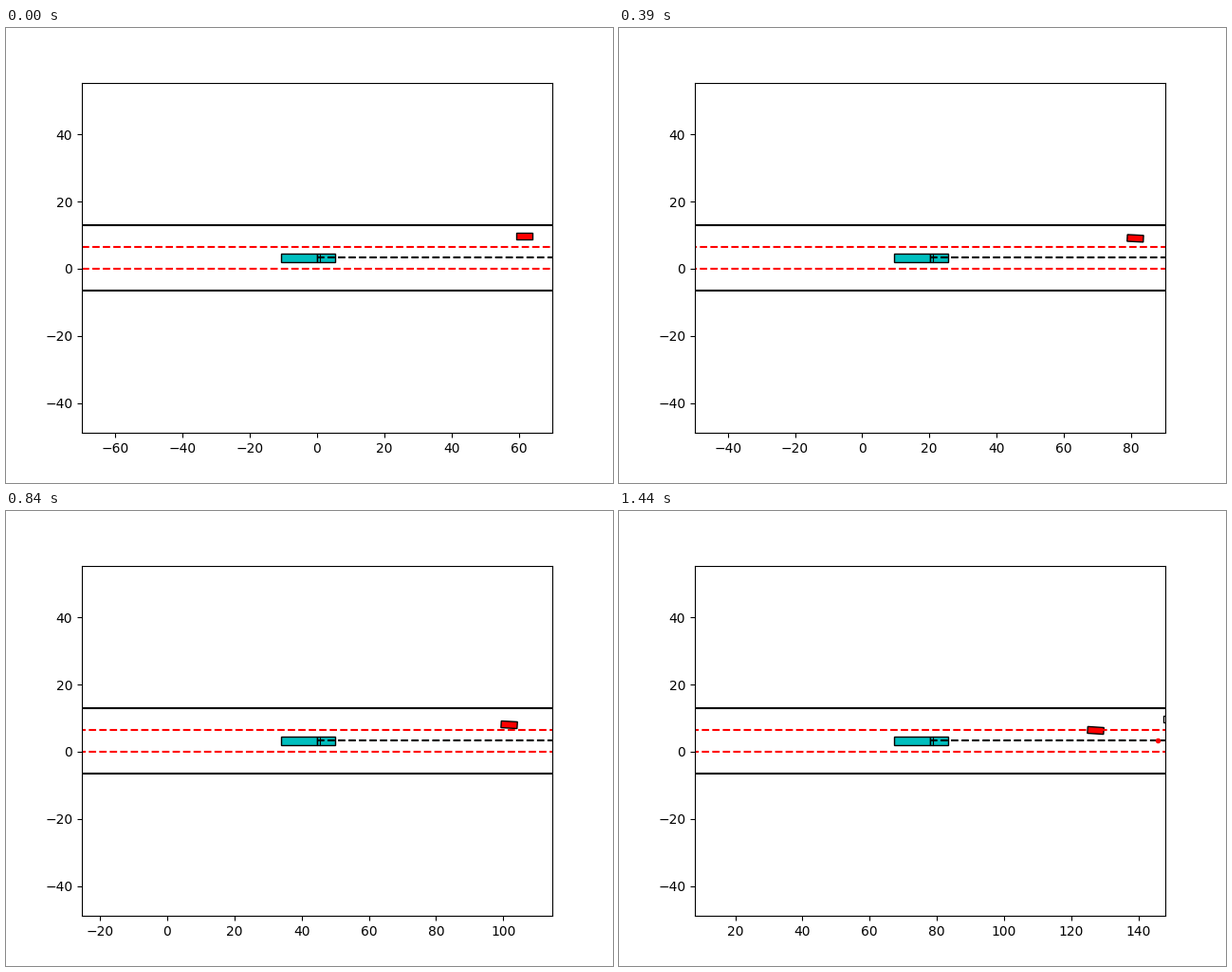
These frames come from a looping animation (640x480 px, 1.47 s). A matplotlib script:

```python
import numpy as np
import matplotlib.pyplot as plt
from matplotlib.animation import FuncAnimation
from matplotlib.patches import Polygon

FRAMES, INTERVAL = 49, 30
HALF_VIEW = 70
PX = 496 / (2 * HALF_VIEW)      # pixels per metre
LANE = 6.5
MID = LANE / 2
FAR = 1000

fig, ax = plt.subplots(figsize=(6.4, 4.8), dpi=100)
half_height = HALF_VIEW * 369.6 / 496
ax.set_ylim(MID - half_height, MID + half_height)

for y, style in ((-LANE, "k-"), (0, "r--"), (LANE, "r--"), (2 * LANE, "k-")):
    ax.plot([-HALF_VIEW, FAR], [y, y], style)
path, = ax.plot([], [], "k--")
dot, = ax.plot([145.7], [MID], "r.")


def box(x, y, length, width, angle=0):
    """Corners of a rectangle centred on x, y and turned by angle degrees."""
    a = np.radians(angle)
    dx = np.array([-1, 1, 1, -1]) * length / 2
    dy = np.array([-1, -1, 1, 1]) * width / 2
    return np.column_stack([x + dx * np.cos(a) - dy * np.sin(a),
                            y + dx * np.sin(a) + dy * np.cos(a)])


def body(color):
    patch = Polygon(box(0, 0, 1, 1), facecolor=color, edgecolor="k", lw=1)
    return ax.add_patch(patch)


trailer, cab, car, next_car = (body(c) for c in ("c", "c", "r", "w"))
hitch, = ax.plot([], [], "k-", lw=0.8, zorder=1.5)


def truck_x(k):
    return 1.5124 * k + 0.00362 * k**2 - 2.66e-5 * k**3


def car_pose(k):
    """Car braking and drifting towards the middle lane."""
    ahead = 61.8 + (0.235 * k - 0.0365 * k**2 + 0.000257 * k**3) / PX
    y = 9.75 - (0.173 * k + 0.00165 * k**2) / PX
    angle = -(1 - np.exp(-k / 3)) * (2.7 + 0.02 * k)
    return truck_x(k) + ahead, y, angle


def update(k):
    x = truck_x(k)
    ax.set_xlim(x - HALF_VIEW, x + HALF_VIEW)
    path.set_data([x, x + FAR], [MID, MID])
    trailer.set_xy(box(x - 5.35, MID, 10.7, 2.55))
    cab.set_xy(box(x + 2.7, MID, 5.4, 2.55))
    hitch.set_data([x + 0.9] * 2, [MID - 1.2, MID + 1.2])

    cx, cy, angle = car_pose(k)
    car.set_xy(box(cx, cy, 4.8, 2, angle))
    rear = x + 69.5 + 0.4 * (FRAMES - 1 - k)
    next_car.set_xy(box(rear + 2.4, 9.75, 4.8, 2))
    return trailer, cab, car, next_car, path, hitch, dot


anim = FuncAnimation(fig, update, frames=FRAMES, interval=INTERVAL,
                     repeat=True, repeat_delay=0, blit=False)
plt.show()
```
